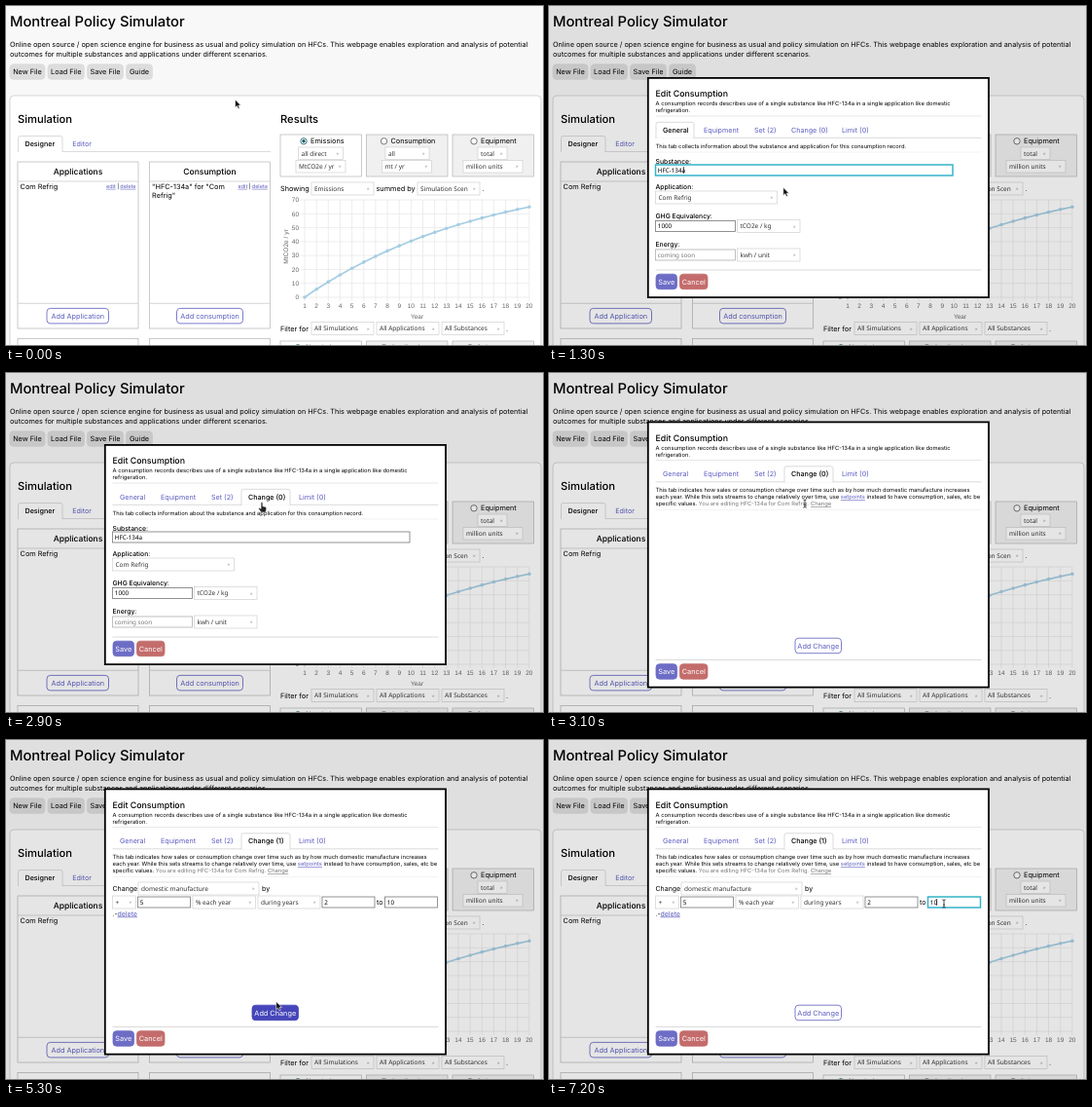
Write an HTML page that moves like this. It is 552x348 px and loops after 8 s.

```html
<!DOCTYPE html>
<html lang="en">
<head>
<meta charset="utf-8">
<title>Montreal Policy Simulator</title>
<style>
  html, body { margin: 0; width: 100%; height: 100%; overflow: hidden; background: #f8f8f8; }
  svg { display: block; width: 552px; height: 348px; font-family: Inter, Roboto, sans-serif; text-rendering: geometricPrecision; }
  .field { font-family: "Noto Sans", "Open Sans", sans-serif; }
  .chart { font-family: "Liberation Sans", Arial, sans-serif; }
  .link { text-decoration: underline; }
</style>
</head>
<body>
<svg id="stage" viewBox="0 0 552 348"></svg>
<script>
const PURPLE = '#5c5cc0', BORDER = '#b4b4b4', FAINT = '#e6e6e6', FOCUS = '#35b3c9';
const LOOP = 8000, STEP = 100;
const stage = document.getElementById('stage');

const text = (x, y, s, size = 7.3, attrs = '') =>
  `<text x="${x}" y="${y}" font-size="${size}" ${attrs}>${s}</text>`;
const centered = 'text-anchor="middle"';
const medium = 'font-weight="500"';
const box = (x, y, w, h, fill = '#fff', stroke = BORDER, r = 0, width = .7) =>
  `<rect x="${x}" y="${y}" width="${w}" height="${h}" rx="${r}" fill="${fill}" stroke="${stroke}" stroke-width="${width}"/>`;
const line = (x1, y1, x2, y2, color = FAINT, width = .7) =>
  `<path d="M${x1} ${y1}L${x2} ${y2}" stroke="${color}" stroke-width="${width}"/>`;

function select(x, y, w, label, h = 13) {
  return box(x, y, w, h, '#fff', '#d0d0d0') +
    text(x + 3, y + h / 2 + 2.3, label, 6.5, 'class="field" fill="#333"') +
    text(x + w - 7, y + h / 2 + 1.5, '»', 5, 'class="field" fill="#888"');
}

function input(x, y, w, value, { focused, caret, hint } = {}) {
  const textWidth = value.length * 3.3;
  const stroke = focused ? FOCUS : hint ? '#b0b0b0' : '#777';
  return box(x, y, w, 11, '#fff', stroke, 0, focused ? 1.5 : .8) +
    text(x + 2.3, y + 7.9, value, 6.3, `class="field" fill="${hint ? '#777' : '#000'}"`) +
    (caret ? line(x + 2.5 + textWidth, y + 2, x + 2.5 + textWidth, y + 9, '#000') : '');
}

function button(x, y, w, label, fill = '#fff', color = PURPLE, stroke = fill) {
  return box(x, y, w, 15.5, fill, stroke, 3.5, .8) +
    text(x + w / 2, y + 10.4, label, 7.3, `${centered} fill="${color}"`);
}

function tabStrip(x1, x2, y, tabs, active) {
  return line(x1, y, x2, y, '#ccc') + tabs.map(([x, w, label], i) =>
    (i === active
      ? `<path d="M${x - 7} ${y + .4}V${y - 14}q0-2 2-2h${w + 10}q2 0 2 2V${y + .4}" fill="#fff" stroke="#ccc" stroke-width=".7"/>`
      : '') +
    text(x, y - 5.6, label, 7.15, i === active ? medium : `fill="${PURPLE}"`)).join('');
}

function radioCard(x, y, label, active) {
  const labelOffset = { Emissions: 31, Equipment: 29 }[label] || 25;
  const labelX = x + labelOffset;
  return box(x, y, 83.5, 43, active ? '#fff' : '#f0f0f0') +
    `<circle cx="${labelX - 7}" cy="${y + 6.8}" r="3.2" fill="#fff" stroke="${active ? '#145a66' : '#555'}" stroke-width=".8"/>` +
    (active ? `<circle cx="${labelX - 7}" cy="${y + 6.8}" r="1.7" fill="#145a66"/>` : '') +
    text(labelX, y + 9.4, label);
}

function listPanel(x, title, lines, addLabel, addX, addW) {
  return box(x, 160, 124, 171) +
    text(x + 62, 173.3, title, 8.5, `${centered} ${medium}`) +
    line(x, 180, x + 124, 180, '#c4c4c4') +
    lines.map((s, i) => text(x + 2.6, 187.7 + i * 9.4, s)).join('') +
    text(x + 91, 186.8, 'edit', 5.5, `class="link" fill="${PURPLE}"`) +
    text(x + 102.3, 186.8, '|', 5.5) +
    text(x + 105.3, 186.8, 'delete', 5.5, `class="link" fill="${PURPLE}"`) +
    line(x, 305.3, x + 124, 305.3, '#c4c4c4') +
    button(addX, 310.4, addW, addLabel, '#fff', PURPLE, PURPLE) +
    box(x, 341.5, 124, 30);
}

function chart() {
  const px = year => 307 + (year - 1) * 12.15;
  const py = value => 299 - value * 100 / 70;
  let grid = '', labels = '', dots = '';
  const points = [];
  for (let v = 0; v <= 70; v += 10) {
    grid += line(303, py(v), px(20), py(v));
    labels += text(301, py(v) + 2.3, v, 6.5, 'text-anchor="end"');
  }
  for (let year = 1; year <= 20; year++) {
    const x = px(year), y = py(92.3 * (1 - .938 ** (year - 1)));
    grid += line(x, 199, x, 303);
    labels += text(x, 309.5, year, 6.5, centered);
    points.push(`${x},${y}`);
    dots += `<circle cx="${x}" cy="${y}" r="1.8"/>`;
  }
  return grid +
    `<g class="chart" fill="#666">${labels}${text(422.5, 320.5, 'Year', 6.5, centered)}` +
    text(0, 0, 'MtCO2e / yr', 6.6, `${centered} transform="translate(289.5 247) rotate(-90)"`) + '</g>' +
    `<polyline points="${points.join(' ')}" fill="none" stroke="#a6cee3" stroke-width="1.7"/>` +
    `<g fill="#a6cee3">${dots}</g>`;
}

const page = box(-1, -1, 554, 350, '#f8f8f8', 'none') +
  text(4, 21.3, 'Montreal Policy Simulator', 14.75, medium) +
  text(4, 42.3, 'Online open source / open science engine for business as usual and policy simulation on HFCs. This webpage enables exploration and analysis of potential', 7.27) +
  text(4, 51.5, 'outcomes for multiple substances and applications under different scenarios.', 7.27) +
  [[4, 36, 'New File'], [43, 37.5, 'Load File'], [83.5, 37, 'Save File'], [123.5, 27, 'Guide']]
    .map(([x, w, s]) => button(x, 59.8, w, s, '#ddd', '#000')).join('') +
  box(4, 92, 546, 280, '#fff', '#c4c4c4', 4) +
  text(12, 119.5, 'Simulation', 11.2, medium) +
  text(282, 119.5, 'Results', 11.2, medium) +
  tabStrip(12, 272, 149.5, [[19.5, 31.5, 'Designer'], [68.3, 21, 'Editor']], 0) +
  listPanel(12, 'Applications', ['Com Refrig'], 'Add Application', 42, 63.5) +
  listPanel(147.5, 'Consumption', ['"HFC-134a" for "Com', 'Refrig"'], 'Add consumption', 175.5, 68) +
  ['Emissions', 'Consumption', 'Equipment'].map((s, i) => radioCard(282 + i * 88.5, 132, s, i === 0)).join('') +
  select(300.5, 145, 46, 'all direct', 12.5) + select(298, 158.5, 51, 'MtCO2e / yr', 12.5) +
  select(390, 145, 45, 'all', 12.5) + select(386.5, 158.5, 51, 'mt / yr', 12.5) +
  select(485, 145, 30, 'total', 12.5) + select(470, 158.5, 61, 'million units', 12.5) +
  text(282, 189.5, 'Showing') + select(314, 181, 64, 'Emissions') +
  text(380.5, 189.5, 'summed by') + select(423, 181, 64, 'Simulation Scen') + text(489.5, 189.5, '.') +
  chart() +
  text(282, 333.5, 'Filter for') + select(314, 324.5, 64, 'All Simulations') +
  select(381, 324.5, 64, 'All Applications') + select(448, 324.5, 64, 'All Substances') + text(514, 333.5, '.') +
  ['Simulations', 'Applications', 'Substances'].map((s, i) => radioCard(282 + i * 88.5, 344, s, i === 0)).join('');

function dialog(top, bottom, activeTab, changes, body) {
  const tabs = [[117, 25, 'General'], [159, 36, 'Equipment'], [211, 22, 'Set (2)'],
    [249, 36, `Change (${changes})`], [301, 26, 'Limit (0)']];
  return '<rect width="552" height="348" fill="#000" opacity=".1"/>' +
    box(101.8, top + .9, 350.2, bottom - top - 1.8, '#fff', '#000', 0, 1.8) +
    text(109.5, top + 20, 'Edit Consumption', 8.8, medium) +
    text(109.5, top + 29.2, 'A consumption records describes use of a single substance like HFC-134a in a single application like domestic', 5.82) +
    text(109.5, top + 36, 'refrigeration.', 5.82) +
    line(109.5, top + 40, 444.5, top + 40, '#ddd') +
    tabStrip(109.5, 444.5, top + 62.3, tabs, activeTab) +
    body +
    line(109.5, bottom - 29, 444.5, bottom - 29, '#ccc') +
    button(110, bottom - 24.8, 21.5, 'Save', '#6d6dc6', '#fff') +
    button(134.5, bottom - 24.8, 28.5, 'Cancel', '#c46c6c', '#fff');
}

function generalDialog(t, cursor) {
  const focused = t < 2900;
  const hovering = focused && cursor.y > 163 && cursor.y < 174;
  const label = (y, s) => text(109.5, y, s, 6.8, medium);
  return dialog(73, 300, focused ? 0 : 3, 0,
    text(109.5, 145.7, 'This tab collects information about the substance and application for this consumption record.', 5.8) +
    line(109.5, 150, 444.5, 150, '#eee') +
    label(161.5, 'Substance:') + input(109.5, 163, 305.5, 'HFC-134a', { focused, caret: t < 1800 }) +
    (hovering ? '<path d="M407 167.5h5l-2.5 3z" fill="#333"/>' : '') +
    label(188, 'Application:') + select(109.5, 190, 125, 'Com Refrig') +
    label(217.7, 'GHG Equivalency:') + input(109.5, 220.5, 82, '1000') + select(193.5, 219.5, 64.5, 'tCO2e / kg') +
    label(247.3, 'Energy:') + input(109.5, 250, 82, 'coming soon', { hint: true }) + select(193.5, 249, 64.5, 'kwh / unit'));
}

function changeDialog(t) {
  const added = t >= 4600, focused = t >= 7100;
  const filled = t >= 4000 && !focused;
  const row = text(109.5, 155, 'Change', 7) + select(136, 146, 124, 'domestic manufacture') + text(263, 155, 'by', 7) +
    select(109.5, 160, 24, '+') + input(135.5, 161, 54, '5') +
    select(192, 160, 64.5, '% each year') + select(259, 160, 64, 'during years') +
    input(325, 161, 54, '2') + text(381, 169, 'to', 7) +
    input(389.5, 161, 54, '10', { focused, caret: focused }) +
    text(109.5, 180.5, '.-', 7) + text(114.5, 180.5, 'delete', 7, `class="link" fill="${PURPLE}"`);
  return dialog(49.5, 323.5, 3, added ? 1 : 0,
    text(109.5, 122.3, 'This tab indicates how sales or consumption change over time such as by how much domestic manufacture increases', 5.8) +
    text(109.5, 129.3, `each year. While this sets streams to change relatively over time, use <tspan class="link" fill="${PURPLE}">setpoints</tspan> instead to have consumption, sales, etc be`, 5.8) +
    text(109.5, 136.2, 'specific values. <tspan fill="#777">You are editing HFC-134a for Com Refrig. <tspan class="link">Change</tspan></tspan>', 5.8) +
    line(109.5, 140.5, 444.5, 140.5, '#eee') +
    (added ? row : '') +
    button(253, 272.2, 47.5, 'Add Change', filled ? '#4646ba' : '#fff', filled ? '#fff' : PURPLE, filled ? '#4646ba' : PURPLE));
}

// Each move: first and last step time, then cubic Bezier points.
const moves = [
  [300, 1000, [235.5, 96], [236, 125], [239, 155], [240.8, 186.3]],
  [1800, 2400, [240.8, 186.3], [245, 170], [256, 150], [263, 134]],
  [3400, 4000, [263, 134], [266, 180], [272, 230], [275.5, 273]],
  [5300, 6100, [275.5, 273], [300, 230], [240, 150], [139, 153]],
  [6200, 7000, [139, 153], [210, 172], [320, 172], [406, 168]],
];

function cursorAt(t) {
  const [start, end, a, b, c, d] = moves.findLast(m => t >= m[0]) || moves[0];
  const k = Math.min(1, Math.max(0, (t - start + STEP) / (end - start + STEP)));
  const u = k * k * (3 - 2 * k), v = 1 - u;
  const at = i => v ** 3 * a[i] + 3 * v * v * u * b[i] + 3 * v * u * u * c[i] + u ** 3 * d[i];
  return { x: at(0), y: at(1) };
}

function cursorKind(t, { x, y }) {
  const within = (from, to) => t >= from && t < to;
  if (within(1000, 1300) || within(2300, 3100) || within(4200, 5300)) return 'hand';
  if (within(1800, 2300) && y > 163 && y < 174) return 'beam';
  if (within(3100, 3500) || (t >= 6200 && x > 389)) return 'beam';
  return 'arrow';
}

const cursorShapes = {
  arrow: '<path d="M0 0V8.2L1.9 6.5L3.2 9.4L4.6 8.8L3.4 6H5.9Z" fill="#111" stroke="#fff" stroke-width=".6"/>',
  hand: '<path d="M-.9-.8q.9-1.2 1.8 0V2.8l3 .7q.9.3.8 1.5L4 9H-.8L-3.4 5.2q.2-1.2 1.4-.6l1.1.8Z" fill="#222" stroke="#fff" stroke-width=".5"/>',
  beam: '<path d="M-1.7-4.2Q0-4.2 0-3Q0-4.2 1.7-4.2M0-3V3M-1.7 4.2Q0 4.2 0 3Q0 4.2 1.7 4.2M-1 1.2H1" fill="none" stroke="#222" stroke-width=".8"/>',
};

function draw(t) {
  const cursor = cursorAt(t);
  const overlay = t < 1300 ? '' : t < 3100 ? generalDialog(t, cursor) : changeDialog(t);
  stage.innerHTML = page + overlay +
    `<g transform="translate(${cursor.x} ${cursor.y})">${cursorShapes[cursorKind(t, cursor)]}</g>`;
}

let shown = -1;
const began = performance.now();
function tick() {
  const t = Math.floor((performance.now() - began) % LOOP / STEP) * STEP;
  if (t !== shown) draw(shown = t);
  requestAnimationFrame(tick);
}
tick();
</script>
</body>
</html>
```
